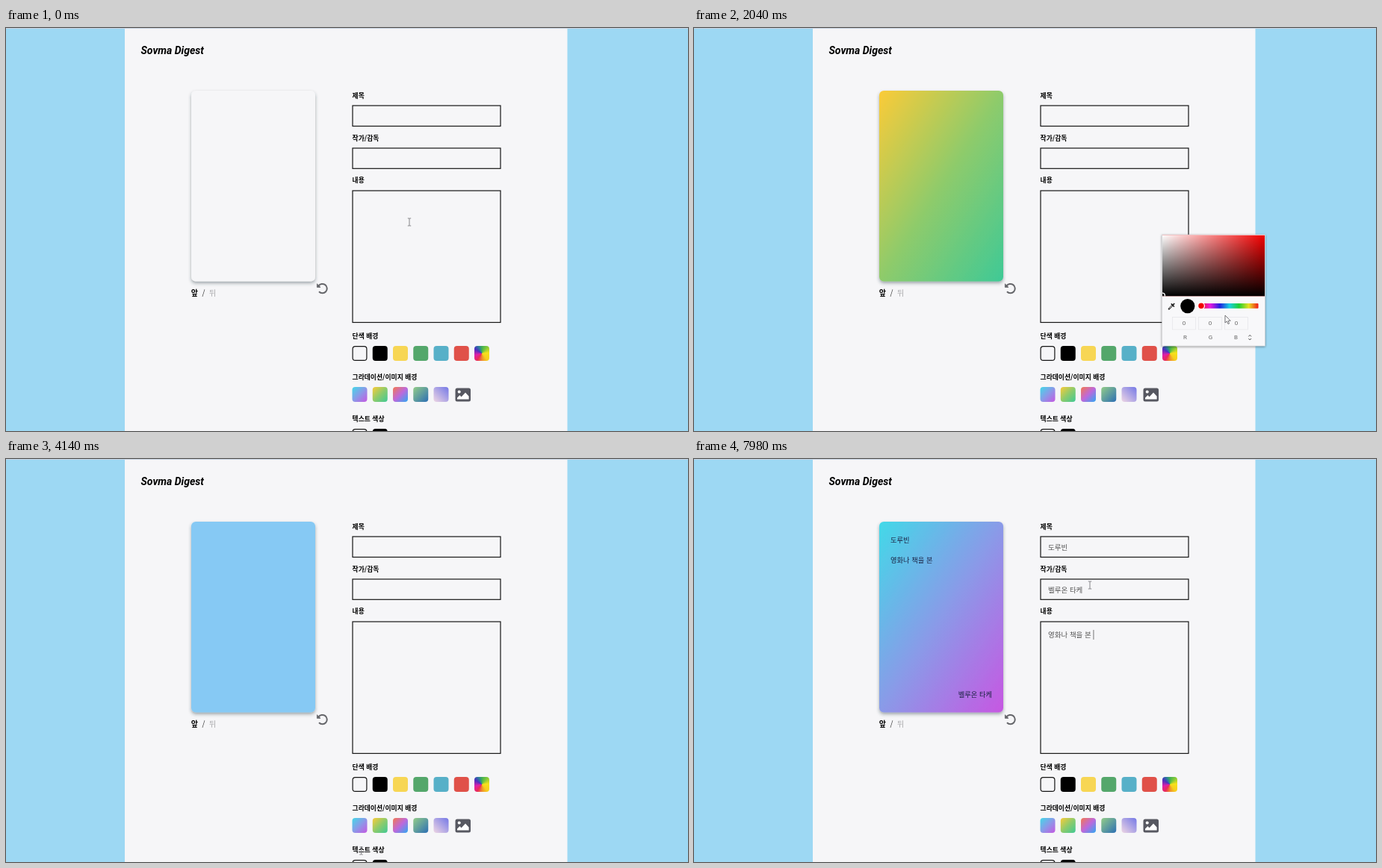
An HTML page that plays this animation: 913x540 px, repeating every 8 s.

```html
<!DOCTYPE html>
<html lang="ko">
<head>
<meta charset="utf-8">
<title>Card editor</title>
<style>
html, body { margin: 0; width: 100%; height: 100%; overflow: hidden; background: #9dd8f3; }
svg { display: block; width: 913px; height: 540px; }
text { font-family: "Noto Sans CJK KR", "Noto Sans CJK", "Noto Sans CJK JP", sans-serif; white-space: pre; }
.brand { font: italic 700 14px Roboto, sans-serif; }
.label { font-size: 8.8px; font-weight: 600; }
.field { fill: none; stroke: #151515; stroke-width: 1.2; }
.value { font-size: 9.5px; fill: #555; }
.card { font-size: 9.3px; fill: #1c2344; }
.num { font: 8px Roboto, sans-serif; fill: #666; text-anchor: middle; }
.wheel { width: 20px; height: 20px; border-radius: 4px;
  background: conic-gradient(#3fae55, #7fc93a 40deg, #f5e21c 85deg, #f7cf1d 140deg, #f08a2c 180deg, #e8285c 215deg, #e01fa8 255deg, #4a2fc0 305deg, #2b7f9c 335deg, #3fae55); }
</style>
</head>
<body>
<svg viewBox="0 0 913 540">
  <defs>
    <filter id="lift" x="-20%" y="-20%" width="140%" height="140%">
      <feDropShadow dx="0" dy="2.5" stdDeviation="2.2" flood-color="#23343a" flood-opacity=".42"/>
    </filter>
    <filter id="pop" x="-10%" y="-10%" width="120%" height="120%">
      <feDropShadow dx="0" dy="1" stdDeviation="1.5" flood-opacity=".45"/>
    </filter>
    <linearGradient id="white"><stop stop-color="#fff"/><stop offset="1" stop-color="#fff" stop-opacity="0"/></linearGradient>
    <linearGradient id="black" x2="0" y2="1"><stop stop-opacity="0"/><stop offset="1"/></linearGradient>
    <clipPath id="svClip"><rect x="627" y="277.5" width="137" height="82"/></clipPath>
  </defs>

  <rect width="913" height="540" fill="#9dd8f3"/>
  <rect x="159" width="592.5" height="540" fill="#f6f6f8"/>
  <rect width="913" height="1" fill="#c9d3e2"/>
  <text class="brand" x="180.5" y="35.3">Sovma Digest</text>

  <rect id="card" x="248" y="84" width="166" height="255.5" rx="6" filter="url(#lift)"/>
  <text id="cardTitle" class="card" x="263" y="111.6"/>
  <text id="cardBody" class="card" x="263" y="138.6"/>
  <text id="cardAuthor" class="card" x="399" y="318.6" text-anchor="end"/>

  <text x="247.8" y="359.3" font-size="10" font-weight="600">앞</text>
  <text x="262.5" y="359.3" font-size="10" fill="#333">/</text>
  <text x="272" y="359.3" font-size="10" fill="#a5a5a8">뒤</text>
  <g stroke="#66676b" fill="none" stroke-width="2">
    <path d="M418.3 345.8A6.2 6.2 0 1 1 419 353.3"/>
    <path d="M416.4 342.8V347.4H421Z" fill="#66676b" stroke-width=".8"/>
  </g>

  <g id="form"></g>
  <text id="title" class="value" x="474" y="121.8"/>
  <text id="author" class="value" x="474" y="178.6"/>
  <text id="body" class="value" x="474" y="239.2"/>
  <path id="caret" stroke="#777" stroke-width="1"/>

  <g id="picker">
    <rect x="626.5" y="277" width="138" height="149" fill="#f8f8fa" stroke="#c8c8cc" stroke-width=".5" filter="url(#pop)"/>
    <g clip-path="url(#svClip)">
      <rect id="tone" x="627" y="277.5" width="137" height="82"/>
      <rect x="627" y="277.5" width="137" height="82" fill="url(#white)"/>
      <rect x="627" y="277.5" width="137" height="82" fill="url(#black)"/>
      <circle id="svKnob" r="3.4" fill="none" stroke="#fff" stroke-width="1.4"/>
    </g>
    <path d="M635.8 376.4L640.6 371.4" stroke="#222" stroke-width="2.2" stroke-linecap="round"/>
    <path d="M636.3 375.8L640 372" stroke="#fff" stroke-width=".9"/>
    <path d="M639.3 369.9L642.4 373M641.2 371.2L642.8 369.5" stroke="#222" stroke-width="1.7" stroke-linecap="round"/>
    <circle id="chip" cx="660.8" cy="372.6" r="9.6"/>
    <rect x="678" y="369" width="77.5" height="6.8" rx="1" fill="url(#hues)"/>
    <circle id="hueKnob" cy="372.3" r="4.4" stroke="#fff" stroke-width="1.3"/>
    <circle id="hueRing" cy="372.3" r="5.3" fill="none" stroke="#333" stroke-width=".9"/>
    <g id="nums"></g>
    <path d="M742.4 413.4L744.2 411.4L746 413.4M742.4 416L744.2 418L746 416" fill="none" stroke="#555" stroke-width="1"/>
  </g>

  <g id="cursor">
    <path id="beam" d="M-2.2 -5H-.6Q0 -5 0 -4.2Q0 -5 .6 -5H2.2M0 -4.2V4.2M-2.2 5H-.6Q0 5 0 4.2Q0 5 .6 5H2.2" fill="none" stroke="#858589" stroke-width="1"/>
    <path id="arrow" d="M0 0V10L2.4 7.9L4 11.6L5.6 10.9L4 7.3H7.2Z" fill="#fff" stroke="#55555a" stroke-width=".8"/>
    <path id="hand" d="M-.9 .3Q0 -.8 .9 .3V4.2Q2 3.5 2.6 4.6Q3.7 4 4.2 5.1Q5.6 4.7 5.7 6.2Q5.8 9 4.4 11.8H-.8Q-2 9.4 -3.6 7.4Q-3.6 5.9 -2.2 6.4L-.9 7.6Z" fill="#fff" stroke="#444" stroke-width=".8"/>
  </g>
</svg>
<script>
const LOOP = 8000, STEP = 60, KEY = 53;
const $ = id => document.getElementById(id);
const set = (el, attrs) => { for (const k in attrs) el.setAttribute(k, attrs[k]); };
const add = (parent, tag, attrs, text = '') => {
  const el = document.createElementNS('http://www.w3.org/2000/svg', tag);
  set(el, attrs);
  el.textContent = text;
  return parent.appendChild(el);
};
const show = (el, on) => el.style.display = on ? '' : 'none';
const clamp = (v, a, b) => Math.min(b, Math.max(a, v));

function gradient(id, colors, [x1, y1, x2, y2] = [0, 0, 1, 1]) {
  const g = add(document.querySelector('defs'), 'linearGradient', { id, x1, y1, x2, y2 });
  colors.forEach((c, i) => add(g, 'stop', { offset: i / (colors.length - 1), 'stop-color': c }));
}
gradient('g1', ['#42d9e8', '#8a9ae8', '#c757e2']);
gradient('g2', ['#fbcb38', '#8ecb6b', '#3fc996']);
gradient('g3', ['#f5774f', '#bd69dc', '#2ea9f2']);
gradient('g4', ['#93cc88', '#2d6fb4']);
gradient('g5', ['#eed6e4', '#7478e6'], [0, 1, 1, 0]);
gradient('hues', ['#f01818', '#e818e0', '#2020e0', '#18d0e0', '#20d030', '#e8e020', '#f01818'], [0, 0, 1, 0]);

// Form
const form = $('form');
const swatchX = i => 463.5 + i * 27.25;
const swatch = (i, y, fill, line) => add(form, 'rect', line
  ? { x: swatchX(i) + .6, y: y + .6, width: 18.8, height: 18.8, rx: 3.5, fill, stroke: '#151515', 'stroke-width': 1.2 }
  : { x: swatchX(i), y, width: 20, height: 20, rx: 4, fill });

[['제목', 93.8], ['작가/감독', 150.6], ['내용', 207.4], ['단색 배경', 416.3], ['그라데이션/이미지 배경', 471.4], ['텍스트 색상', 527.2]]
  .forEach(([s, y]) => add(form, 'text', { class: 'label', x: 463.6, y }, s));
[[104, 27.5], [161, 27.3], [218, 176.5]]
  .forEach(([y, height]) => add(form, 'rect', { class: 'field', x: 464, y, width: 198, height }));

const PAGE = '#f6f6f8', YELLOW = '#f7d654', GREEN = '#54a76b', TEAL = '#57b0c8';
[PAGE, '#000', YELLOW, GREEN, TEAL, '#e05149'].forEach((c, i) => swatch(i, 426, c, !i));
const wheel = add(form, 'foreignObject', { x: swatchX(6), y: 426, width: 20, height: 20 });
wheel.appendChild(document.createElement('div')).className = 'wheel';
for (let i = 0; i < 5; i++) swatch(i, 481, `url(#g${i + 1})`);
add(form, 'rect', { x: 601.5, y: 482.5, width: 20.5, height: 18, rx: 2.5, fill: '#575861' });
add(form, 'circle', { cx: 606.7, cy: 487.4, r: 2, fill: '#fff' });
add(form, 'path', { d: 'M604 497.5V495.5L607.4 492L609.6 494.2L615 488.6L619.6 493.4V497.5Z', fill: '#fff' });
swatch(0, 537, PAGE, true);
swatch(1, 537, '#000');

// Picker number boxes
const nums = [0, 1, 2].map(i => {
  const x = 656 + i * 35;
  add($('nums'), 'rect', { x: x - 15.5, y: 387.5, width: 31, height: 16.5, fill: 'none', stroke: '#e4e4e8', 'stroke-width': .7 });
  add($('nums'), 'text', { class: 'num', x: 657.5 + i * 34, y: 417.3 }, 'RGB'[i]);
  return add($('nums'), 'text', { class: 'num', x, y: 398.2 });
});

// Pointer route: time, x, y
const ROUTE = [
  [0, 540, 260], [120, 540, 260], [360, 530, 436], [480, 530, 436], [600, 555, 437], [660, 555, 437],
  [780, 582, 437], [900, 582, 437], [1080, 556, 494], [1200, 556, 494], [1380, 502, 492], [1500, 502, 492],
  [1740, 637, 437], [1860, 637, 437], [2040, 711, 385], [2160, 680, 373], [2460, 712, 373], [2520, 712, 373],
  [2700, 694, 293], [2760, 694, 293], [3120, 689, 281], [3420, 689, 281], [3600, 690, 460], [3720, 690, 460],
  [4140, 475.5, 525], [4320, 473, 491], [4440, 473, 491], [4740, 530, 118], [5640, 530, 118], [5820, 530, 169], [LOOP, 530, 169]
];
function pointer(t) {
  const i = ROUTE.findIndex(p => p[0] > t);
  const [a, x, y] = ROUTE[i - 1], [b, u, v] = ROUTE[i];
  const k = (t - a) / (b - a), e = k * k * (3 - 2 * k);
  return [x + (u - x) * e, y + (v - y) * e];
}

const OPEN = 1800, HUE = 2160, PICK = 2760, CLOSE = 3660;
const FILLS = [[0, PAGE], [420, YELLOW], [660, GREEN], [840, TEAL], [1140, 'url(#g4)'], [1440, 'url(#g2)'], [PICK, 'pick'], [4380, 'url(#g1)']];

function cursorKind(x, y, open) {
  const inside = (a, b, c, d) => x >= a && x <= c && y >= b && y <= d;
  if (open && inside(626, 277, 765, 426)) return 'arrow';
  if (inside(463, 426, 647, 446) || inside(463, 481, 622, 501)) return (x - 463.5) % 27.25 <= 20 ? 'hand' : 'arrow';
  const text = inside(464, 104, 662, 131) || inside(464, 161, 662, 188) || inside(464, 218, 662, 394) || inside(464, 518, 507, 530);
  return text ? 'beam' : 'arrow';
}

function rgb(h, s, v) {
  return [5, 3, 1].map(n => {
    const k = (n + h / 60) % 6;
    return Math.round(255 * v * (1 - s * clamp(Math.min(k, 4 - k), 0, 1)));
  });
}

// Hangul is composed key by key: initial, vowel, final
const INITIALS = 'ㄱㄲㄴㄷㄸㄹㅁㅂㅃㅅㅆㅇㅈㅉㅊㅋㅌㅍㅎ';
function strokes(text) {
  const out = [''];
  let done = '';
  for (const ch of text) {
    const code = ch.charCodeAt(0) - 0xAC00;
    if (code >= 0) {
      out.push(done + INITIALS[Math.floor(code / 588)]);
      if (code % 28) out.push(done + String.fromCharCode(0xAC00 + code - code % 28));
    }
    out.push(done += ch);
  }
  return out;
}
const FIELDS = [
  { id: 'title', copy: 'cardTitle', focus: 4800, start: 5040, y: 118, keys: strokes('도루빈') },
  { id: 'author', copy: 'cardAuthor', focus: 5820, start: 5940, y: 175, keys: strokes('벨루온 타케') },
  { id: 'body', copy: 'cardBody', focus: 6840, start: 6960, y: 235.5, keys: strokes('영화나 책을 본 ') }
];

function drawPicker(t, x, y) {
  const hueX = t < HUE ? 679 : clamp(pointer(Math.min(t, 2460))[0], 679, 755);
  const hue = 360 * (1 - (hueX - 679) / 76) % 360;
  const [px, py] = t < PICK ? [627, 358.5] : pointer(Math.min(t, 3420));
  const s = (px - 627) / 137, v = t < PICK ? 0 : 1 - (py - 277.5) / 82;
  const color = rgb(hue, s, v), css = `rgb(${color})`, pure = `rgb(${rgb(hue, 1, .95)})`;
  show($('picker'), t >= OPEN && t < CLOSE);
  set($('tone'), { fill: pure });
  set($('svKnob'), { cx: px, cy: py });
  set($('chip'), { fill: css });
  set($('hueKnob'), { cx: hueX, fill: pure });
  set($('hueRing'), { cx: hueX });
  show($('hueRing'), t >= HUE);
  nums.forEach((n, i) => n.textContent = color[i]);
  return css;
}

function draw(ms) {
  const t = Math.floor(ms / STEP) * STEP;
  const [x, y] = pointer(t);
  const picked = drawPicker(t, x, y);
  const fill = FILLS.filter(f => f[0] <= t).pop()[1];
  set($('card'), { fill: fill === 'pick' ? picked : fill });

  for (const f of FIELDS) {
    const n = clamp(Math.floor((t - f.start) / KEY), 0, f.keys.length - 1);
    $(f.id).textContent = f.keys[n];
    $(f.copy).textContent = f.keys[n].trimEnd();
  }
  const active = FIELDS.filter(f => f.focus <= t).pop();
  const lit = active && t < active.start + active.keys.length * KEY + 120;
  show($('caret'), lit);
  if (lit) {
    const cx = 474.5 + $(active.id).getComputedTextLength();
    set($('caret'), { d: `M${cx} ${active.y - 6.5}V${active.y + 6.5}` });
  }

  const kind = cursorKind(x, y, t >= OPEN && t < CLOSE);
  for (const k of ['beam', 'arrow', 'hand']) show($(k), k === kind);
  set($('cursor'), { transform: `translate(${x} ${y})` });
}

const begin = performance.now();
function tick() {
  draw((performance.now() - begin) % LOOP);
  requestAnimationFrame(tick);
}
tick();
</script>
</body>
</html>
```
